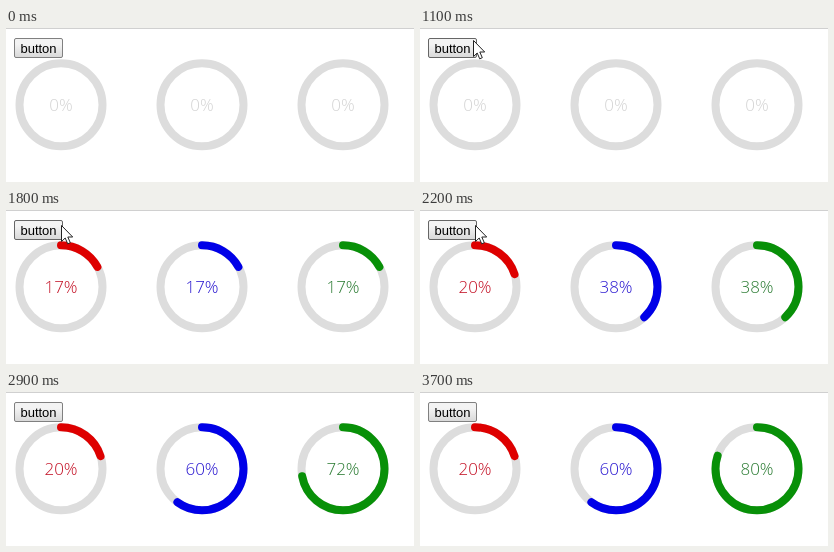
Animation of 408 by 154 pixels, one loop 4100 ms. Source, as an HTML page:

```html
<!DOCTYPE html>
<html>
<head>
<meta charset="utf-8">
<style>
  html, body { margin: 0; height: 100%; overflow: hidden; background: #fff; }
  svg { display: block; width: 408px; height: 154px; }
  circle { fill: none; stroke-width: 8; }
  .track { stroke: #ddd; }
  .arc { stroke-linecap: round; }
  text { text-anchor: middle; }
  .label { font: 300 17px "Open Sans", sans-serif; }
  .caption { font: 13px Arial, "Liberation Sans", sans-serif; }
</style>
</head>
<body>
<svg viewBox="0 0 408 154">
  <defs>
    <linearGradient id="up" x2="0" y2="1">
      <stop offset=".3" stop-color="#f3f3f3"/><stop offset="1" stop-color="#d8d8d8"/>
    </linearGradient>
    <linearGradient id="down" x2="0" y2="1">
      <stop offset="0" stop-color="#d4d4d4"/><stop offset="1" stop-color="#eee"/>
    </linearGradient>
  </defs>
  <path d="M0 .5H408" stroke="#d0d0d0"/>
  <rect id="button" x="8.5" y="10.5" width="48" height="19" rx="1.5"/>
  <text class="caption" x="32.5" y="24.5">button</text>
  <g id="dials"></g>
  <path id="pointer" d="M.5 .5V16.5L4.2 13L6.7 18.8L9.3 17.7L6.8 12H11.7Z" fill="#fff" stroke="#222"/>
</svg>
<script>
const LOOP = 4100, STEP = 100, RADIUS = 41.5;
const LENGTH = 2 * Math.PI * RADIUS;
const $ = id => document.getElementById(id);

// Rows are [time, value, ...]; values run straight between rows.
const progress = [[1440, 0], [1700, 13], [1800, 17], [2200, 38], [2500, 53], [2900, 72], [3060, 80]];
const pointerPath = [
  [600, 42, 113], [800, 47, 50], [1000, 52, 16], [1100, 53, 12], [1300, 55, 15],
  [2400, 55, 15], [2500, 63, 15], [2600, 120, 14], [2800, 398, 2]
];

function sample(rows, t) {
  if (t <= rows[0][0]) return rows[0].slice(1);
  const i = rows.findIndex(row => row[0] >= t);
  if (i < 0) return rows[rows.length - 1].slice(1);
  const [a, b] = [rows[i - 1], rows[i]];
  const k = (t - a[0]) / (b[0] - a[0]);
  return a.slice(1).map((v, n) => v + (b[n + 1] - v) * k);
}

const dials = [
  [55, 20, "#de0000", "#c41428"],
  [196, 60, "#0000e8", "#2a18d0"],
  [337, 80, "#089008", "#2c7c34"]
].map(([x, limit, color, ink]) => {
  const g = document.createElementNS("http://www.w3.org/2000/svg", "g");
  g.setAttribute("transform", `translate(${x} 76.8)`);
  g.innerHTML = `<circle class="track" r="${RADIUS}"/>
    <circle class="arc" r="${RADIUS}" stroke="${color}" transform="rotate(-90)"/>
    <text class="label" y="6.2"></text>`;
  $("dials").append(g);
  const [, arc, label] = g.children;
  return value => {
    const shown = Math.min(value, limit);
    arc.style.display = shown > 0 ? "" : "none";
    arc.setAttribute("stroke-dasharray", `${LENGTH * shown / 100} ${LENGTH}`);
    label.textContent = Math.round(shown) + "%";
    label.setAttribute("fill", shown > 0 ? ink : "#d4d4d4");
  };
});

function draw(now) {
  const t = Math.floor(now % LOOP / STEP) * STEP;
  const [value] = sample(progress, t);
  dials.forEach(update => update(value));

  const [x, y] = sample(pointerPath, t);
  $("pointer").style.display = t >= 600 && t < 2900 ? "" : "none";
  $("pointer").setAttribute("transform", `translate(${Math.round(x)} ${Math.round(y)})`);

  const hover = t >= 1000 && t < 2500;
  $("button").setAttribute("fill", t === 1400 ? "url(#down)" : "url(#up)");
  $("button").setAttribute("stroke", hover ? "#666" : "#808080");
  requestAnimationFrame(draw);
}
requestAnimationFrame(draw);
</script>
</body>
</html>
```
